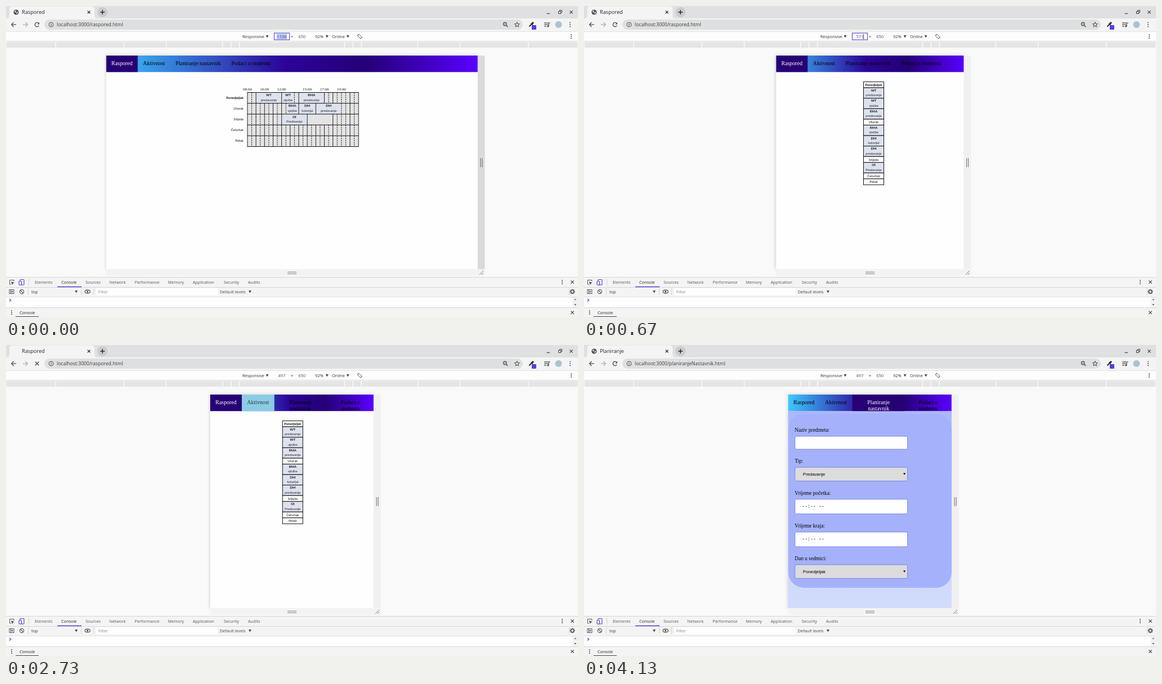
An HTML page with a canvas that plays this animation: 1014x552 px, repeating every 8000 ms.

```html
<!DOCTYPE html>
<html lang="bs">
<head>
<meta charset="utf-8">
<title>Raspored</title>
<style>
html, body { margin: 0; width: 100%; height: 100%; overflow: hidden; background: #f9f9f9; }
canvas { display: block; width: 1014px; height: 552px; }
</style>
</head>
<body>
<canvas id="stage"></canvas>
<script>
const canvas = document.getElementById('stage');
const c = canvas.getContext('2d');
const dpr = window.devicePixelRatio || 1;
canvas.width = 1014 * dpr;
canvas.height = 552 * dpr;

const LOOP = 8000;
const UI = '"Open Sans", "Noto Sans", sans-serif';
const SERIF = '"Liberation Serif", "Times New Roman", serif';
const SANS = '"Liberation Sans", Arial, sans-serif';
const MONO = '"Liberation Mono", monospace';
const PAGE = 'Lato, "Open Sans", sans-serif';
const TOP = 88, NAV_END = 117.3, BOTTOM = 467;

// ---- drawing helpers ----
function rect(x, y, w, h, fill) {
  c.fillStyle = fill;
  c.fillRect(x, y, w, h);
}
function round(x, y, w, h, r, fill, stroke, lw = 1) {
  c.beginPath();
  c.roundRect(x, y, w, h, r);
  if (fill) { c.fillStyle = fill; c.fill(); }
  if (stroke) { c.strokeStyle = stroke; c.lineWidth = lw; c.stroke(); }
}
function path(points, color, lw = 1, fill) {
  c.beginPath();
  for (let i = 0; i < points.length; i += 2) c.lineTo(points[i], points[i + 1]);
  if (fill) { c.fillStyle = color; c.fill(); return; }
  c.strokeStyle = color;
  c.lineWidth = lw;
  c.stroke();
}
function arc(x, y, r, color, lw, from = 0, to = Math.PI * 2) {
  c.beginPath();
  c.arc(x, y, r, from, to);
  if (lw) { c.strokeStyle = color; c.lineWidth = lw; c.stroke(); }
  else { c.fillStyle = color; c.fill(); }
}
function text(s, x, y, size, family = UI, color = '#333', align = 'left', weight = '') {
  c.font = `${weight} ${size}px ${family}`;
  c.fillStyle = color;
  c.textAlign = align;
  c.fillText(s, x, y);
}
function cross(x, y, r, color, lw = 1.2) {
  path([x - r, y - r, x + r, y + r], color, lw);
  path([x - r, y + r, x + r, y - r], color, lw);
}
function dots(x, y, gap = 3.5) {
  for (const d of [-gap, 0, gap]) arc(x, y + d, 0.95, '#444');
}
function down(x, y, r = 2.4, color = '#444') {
  path([x - r, y - r * 0.8, x + r, y - r * 0.8, x, y + r], color, 1, true);
}
function gradient(x0, y0, x1, y1, stops) {
  const g = c.createLinearGradient(x0, y0, x1, y1);
  for (const [p, color] of stops) g.addColorStop(p, color);
  return g;
}

// ---- timeline ----
const DRAG = [[0, 1130], [1, 1112], [4, 939], [10, 571], [11, 530], [12, 506], [13, 495], [14, 497]];

function widthAt(step) {
  const i = DRAG.findIndex(k => k[0] >= step);
  if (i < 0) return 497;
  if (i === 0) return 1130;
  const [a, va] = DRAG[i - 1], [b, vb] = DRAG[i];
  return Math.round(va + (vb - va) * (step - a) / (b - a));
}

function stateAt(t) {
  const step = Math.floor(t * 0.015 + 0.055);
  return {
    width: widthAt(step),
    selected: step < 1,
    dragging: step >= 1 && step < 14,
    grip: step < 1 || (t >= 1870 && t < 2000),
    caret: step >= 1 && t < 2130,
    focus: t < 2730,
    page: t < 2800 ? 0 : t < 4130 ? 1 : 2,
    hover: t >= 2730 && t < 2800 ? 1 : t >= 4070 && t < 4130 ? 2 : -1,
    loading: (t >= 2730 && t < 2870) || (t >= 4070 && t < 4130)
  };
}

// ---- browser frame ----
const TITLES = ['Raspored', 'Aktivnosti', 'Planiranje'];
const FILES = ['raspored', 'aktivnost', 'planiranjeNastavnik'];

function drawBrowser(s) {
  rect(0, 0, 1014, 22, '#dfe0e1');
  rect(0, 22, 1014, 23, '#f4f4f4');
  c.beginPath();
  c.moveTo(1, 22);
  c.quadraticCurveTo(6, 22, 6, 16);
  c.lineTo(6, 6);
  c.quadraticCurveTo(6, 0.5, 11, 0.5);
  c.lineTo(152, 0.5);
  c.quadraticCurveTo(157, 0.5, 157, 6);
  c.lineTo(157, 16);
  c.quadraticCurveTo(157, 22, 162, 22);
  c.fillStyle = '#f4f4f4';
  c.fill();
  if (!s.loading) {
    arc(18, 11, 4.6, '#4c4f52');
    path([15, 9, 18, 8, 18, 10, 16, 12], '#e4e4e4', 1, true);
    path([19, 11, 21.5, 10, 20, 14, 18, 13], '#e4e4e4', 1, true);
  }
  text(TITLES[s.page], 28, 14, 9.2, UI, '#222');
  cross(147, 11, 2.4, '#222', 1.3);
  arc(171, 11, 9, '#cbcccd');
  path([167, 11, 175, 11], '#222', 1.4);
  path([171, 7, 171, 15], '#222', 1.4);

  path([958.5, 13.5, 964, 13.5], '#444', 1.2);
  c.strokeStyle = '#444';
  c.lineWidth = 1;
  c.strokeRect(979.5, 9.5, 4, 4);
  path([981.5, 9, 981.5, 7.5, 985.5, 7.5, 985.5, 11.5, 984, 11.5], '#444');
  cross(1002, 11, 2.6, '#444');

  const arrow = (x, d, color) => {
    path([x - 4, 33, x + 4, 33], color, 1.2);
    path([x + d * 0.5, 29, x + d * 4.3, 33, x + d * 0.5, 37], color, 1.2);
  };
  arrow(14, -1, '#444');
  arrow(34, 1, '#aaa');
  if (s.loading) cross(55, 33, 3.2, '#444', 1.3);
  else {
    arc(55, 33, 3.7, '#444', 1.3, 0.5, 5.5);
    path([59, 29, 59, 32.5, 55.5, 32.5], '#444', 1, true);
  }

  round(68, 24, 848, 18, 9, '#dedfe0');
  arc(80, 33, 4, '#555', 1);
  path([80, 32, 80, 35.3], '#555', 1.1);
  path([80, 30.4, 80, 31.4], '#555', 1.1);
  text('localhost:3000/' + FILES[s.page] + '.html', 90, 36.2, 8.55, UI, '#3c3c3c');
  arc(884.5, 32, 2.9, '#444', 1.1);
  path([886.7, 34.2, 889.5, 37], '#444', 1.3);
  path([883, 32, 886, 32], '#444', 0.8);
  const star = [];
  for (let i = 0; i <= 10; i++) {
    const r = i % 2 ? 2 : 4.6, a = i * Math.PI / 5 - Math.PI / 2;
    star.push(906 + r * Math.cos(a), 33.2 + r * Math.sin(a));
  }
  path(star, '#444', 1);

  path([927.5, 36.5, 932, 32], '#222', 1.8);
  path([930.5, 30.5, 934, 34], '#222', 1.4);
  path([932.5, 31.5, 935, 29], '#222', 3);
  round(932, 34, 8, 8, 1, '#5141dd');
  for (const y of [30, 33]) path([954, y, 961, y], '#444', 1.2);
  path([954, 36, 958, 36], '#444', 1.2);
  path([962, 36, 962, 30, 965, 30], '#444', 1.2);
  arc(960.8, 36, 1.5, '#444');
  arc(979.5, 33, 6, '#a9c3d2');
  dots(1000, 33);
}

function drawDeviceBar(s) {
  rect(0, 45, 1014, 17.5, '#fdfdfd');
  rect(0, 45, 1014, 0.7, '#d8d8d8');
  rect(0, 62, 1014, 0.8, '#d4d4d4');
  text('Responsive', 419, 57, 7.4);
  down(463, 54);
  if (s.focus) {
    c.strokeStyle = '#5a50d8';
    c.lineWidth = 1.2;
    c.strokeRect(475.5, 48, 27, 12);
  }
  if (s.selected) rect(480, 49.5, 18, 9.5, '#b4c6ee');
  text(s.width, 489, 57, 7.6, UI, '#4b4e7c', 'center');
  if (s.caret) rect(495.2, 50, 0.9, 9, '#222');
  text('×', 507, 57, 7.6, UI, '#333', 'center');
  text('650', 524.7, 57, 7.6, UI, '#4b4e7c', 'center');
  text('92%', 548, 57, 7.4);
  down(569, 54);
  text('Online', 578, 57, 7.4);
  down(606, 54);
  c.save();
  c.translate(627, 54);
  c.rotate(-Math.PI / 4);
  round(-1.8, -3.6, 3.6, 7.2, 0.5, null, '#555', 0.9);
  c.restore();
  arc(627, 54, 4.2, '#555', 0.8, 0.2, 1.4);
  arc(627, 54, 4.2, '#555', 0.8, 3.3, 4.5);
  dots(1002, 54, 3);

  rect(1, 64, 1012, 10, '#e5e5e5');
  for (const x of [88, 209, 284, 384, 399, 414]) {
    rect(x - 0.7, 64, 1.4, 10, '#fdfdfd');
    rect(1014 - x - 0.7, 64, 1.4, 10, '#fdfdfd');
  }
}

function drawDevTools() {
  rect(0, 481, 1014, 71, '#f4f4f4');
  for (const y of [481, 499, 516, 535]) rect(0, y, 1014, 0.8, '#cfcfcf');
  path([9, 494, 6.5, 494, 6.5, 486.5, 14, 486.5, 14, 489], '#555');
  path([9, 489, 15, 491.5, 12.3, 492.3, 11, 495], '#444', 1, true);
  round(25, 485.5, 7, 9.5, 1, null, '#5b3fd6', 1.1);
  round(23, 488.5, 4.5, 6.5, 1, '#f4f4f4', '#5b3fd6', 1.1);
  rect(40, 484, 0.8, 12, '#ccc');
  const tabs = { Elements: 51, Console: 98, Sources: 141, Network: 183, Performance: 228,
    Memory: 287, Application: 331, Security: 386, Audits: 429 };
  for (const name in tabs) text(name, tabs[name], 493, 7.3, UI, name === 'Console' ? '#222' : '#555');
  rect(91, 497.7, 43, 1.4, '#5a35d8');
  dots(986, 490, 3);
  cross(1004, 490, 2.7, '#444');

  c.strokeStyle = '#555';
  c.lineWidth = 1;
  c.strokeRect(6, 503.5, 8, 7);
  path([8.5, 503.5, 8.5, 510.5], '#555');
  path([10, 505, 13, 507, 10, 509], '#555', 1, true);
  arc(28, 507, 3.6, '#555', 1.1);
  path([25.5, 504.5, 30.5, 509.5], '#555', 1.1);
  rect(39, 501, 0.8, 12, '#ccc');
  text('top', 45, 510, 7.4);
  down(124.5, 507);
  rect(133, 501, 0.8, 12, '#ccc');
  c.beginPath();
  c.ellipse(144.5, 507, 4.6, 2.9, 0, 0, Math.PI * 2);
  c.strokeStyle = '#444';
  c.lineWidth = 1.1;
  c.stroke();
  arc(144.5, 507, 1.6, '#444');
  rect(155, 501, 0.8, 12, '#ccc');
  rect(160, 501, 215, 12.5, '#fefefe');
  text('Filter', 163.5, 510, 7.4, UI, '#888');
  text('Default levels', 379, 510, 7.3, UI, '#444');
  down(432.5, 507);
  rect(998, 501, 0.8, 12, '#ccc');
  for (let i = 0; i < 8; i++) {
    const a = i * Math.PI / 4;
    path([1004 + 2.5 * Math.cos(a), 507 + 2.5 * Math.sin(a),
      1004 + 4.6 * Math.cos(a), 507 + 4.6 * Math.sin(a)], '#555', 1.6);
  }
  arc(1004, 507, 2.7, '#555', 1.6);

  rect(0, 516.8, 1014, 18.2, '#fefefe');
  path([6, 520, 8.8, 522.3, 6, 524.6], '#4d50dd', 1.3);
  rect(1004.5, 517, 9.5, 18, '#f1f1f1');
  path([1007.2, 522, 1009.2, 519.5, 1011.2, 522], '#777', 1, true);
  path([1007.2, 529, 1009.2, 531.5, 1011.2, 529], '#555', 1, true);
  dots(10, 544, 3);
  text('Console', 24, 547, 7.3, UI, '#222');
  rect(17, 550.8, 41, 1.2, '#5c5470');
  cross(1004, 544, 2.7, '#444');
}

// ---- device frame ----
function drawDevice(x0, x1, grip) {
  rect(0, 74, 1014, 407, '#f9f9f9');
  c.save();
  c.shadowColor = 'rgba(0,0,0,.2)';
  c.shadowBlur = 6;
  rect(x0, TOP, x1 - x0, BOTTOM - TOP, '#fefefe');
  c.restore();
  rect(x1, TOP, 12.5, BOTTOM - TOP, grip ? '#dadada' : '#f0f0f0');
  rect(x0, BOTTOM, x1 - x0 + 12.5, 12, '#f3f3f3');
  for (const dx of [5, 8]) rect(x1 + dx - 0.5, 270, 1.1, 16, '#777');
  for (const y of [471.7, 474.7]) rect(499, y, 16, 1.1, '#888');
  path([x1 + 3, 477, x1 + 10, 470], '#777');
  path([x1 + 7, 477, x1 + 10, 474], '#777');
}

const LINKS = [['Raspored'], ['Aktivnost'], ['Planiranje', 'nastavnik'], ['Podaci o', 'studentu']];

function drawNav(s, x0, x1) {
  const size = 9.9, pad = 9.35;
  c.font = `${size}px ${SERIF}`;
  const widths = LINKS.map(l => c.measureText(l.join(' ')).width + 2 * pad);
  const rest = x1 - x0 - widths[0] - widths[1];
  const wrap = widths[2] + widths[3] > rest;
  if (wrap) {
    widths[2] = rest * 0.528;
    widths[3] = rest - widths[2];
  }
  c.save();
  c.beginPath();
  c.rect(x0, TOP, x1 - x0, NAV_END - TOP);
  c.clip();
  rect(x0, TOP, x1 - x0, 30, gradient(x0, 0, x1, 0,
    [[0, '#3cc8ff'], [0.48, '#2b0498'], [0.7, '#240076'], [1, '#5a00ff']]));
  let x = x0;
  LINKS.forEach((lines, i) => {
    const active = i === s.page, over = i === s.hover;
    if (active || over) rect(x, TOP, widths[i], 30, over ? '#8accE3' : '#270074');
    const color = over ? '#30383c' : active ? '#fff' : '#000';
    const rows = wrap ? lines : [lines.join(' ')];
    rows.forEach((r, k) => text(r, x + widths[i] / 2, 105 + k * 11.4, size, SERIF, color, 'center'));
    x += widths[i];
  });
  c.restore();
}

// ---- timetable ----
// classes: name, kind, start and end in half hours after 08:00
const WEEK = [
  ['Ponedjeljak', ['WT', 'predavanje', 2, 8], ['WT', 'vježbe', 8, 11], ['RMA', 'predavanje', 12, 18]],
  ['Utorak', ['RMA', 'vježbe', 9, 12], ['DM', 'tutorijal', 12, 16], ['DM', 'predavanje', 16, 22]],
  ['Srijeda', ['OI', 'Predavanje', 8, 14], ['', '', 14, 20]],
  ['Četvrtak'],
  ['Petak']
];
const FILL = '#dde2ee', INK = '#111';

function classText(name, kind, x, y) {
  text(name, x, y + 6.7, 5.9, PAGE, INK, 'center', 'bold');
  text(kind, x, y + 15, 5.9, PAGE, '#222', 'center');
}

function drawTable(left) {
  const cell = 197 / 26, row = 19.2, y0 = 153.5;
  const at = i => left + i * cell;
  for (const h of [8, 10, 12, 15, 17, 19]) {
    text(String(h).padStart(2, '0') + ':00', at((h - 8) * 2), 150, 7, SERIF, INK, 'center');
  }
  rect(left, y0, 197, row * 5, '#e4e4e4');
  WEEK.forEach(([day, ...classes], r) => {
    const y = y0 + r * row;
    text(day, left - 7, y + 11, 5.9, PAGE, INK, 'right', r ? '' : 'bold');
    for (const [name, , from, to] of classes) {
      if (name) rect(at(from), y, (to - from) * cell, row, FILL);
    }
    for (let i = 0; i <= 26; i++) {
      if (classes.some(k => i > k[2] && i < k[3])) continue;
      c.setLineDash(i % 2 || i === 22 ? [2.4, 1.4] : []);
      path([at(i), y, at(i), y + row], INK, 0.9);
    }
    c.setLineDash([]);
    for (const [name, kind, from, to] of classes) classText(name, kind, at((from + to) / 2), y);
  });
  for (let r = 0; r <= 5; r++) path([left - 0.4, y0 + r * row, left + 197.4, y0 + r * row], INK, 1);
}

function drawList(cx) {
  let y = 134.6;
  const box = (h, fill) => {
    rect(cx - 18, y, 36, h, fill);
    c.strokeStyle = INK;
    c.lineWidth = 1;
    c.strokeRect(cx - 18, y, 36, h);
  };
  WEEK.forEach(([day, ...classes], r) => {
    box(10.5, '#fefefe');
    text(day, cx, y + 7.3, 5.9, PAGE, INK, 'center', r ? '' : 'bold');
    y += 10.5;
    for (const [name, kind] of classes) {
      if (!name) continue;
      box(18.6, FILL);
      classText(name, kind, cx, y);
      y += 18.6;
    }
  });
}

// ---- other pages ----
function drawSky(x0, x1) {
  rect(x0, NAV_END, x1 - x0, BOTTOM - NAV_END, gradient(0, NAV_END, 0, BOTTOM,
    [[0, '#abb6fc'], [0.13, '#b3c0fb'], [0.36, '#c9d5fb'], [1, '#d1dcfb']]));
}

function drawActivity(y, x, w, h, r, legend, kind, from, to) {
  const ink = '#2a7293', soft = '#3b7ba8', cx = 506;
  c.save();
  c.beginPath();
  c.rect(x - 3, y - 3, 466 - x + 3, 12);
  c.rect(548, y - 3, x + w - 545, 12);
  c.rect(x - 3, y + 8, w + 6, h);
  c.clip();
  round(x, y, w, h, r, null, ink, 1.8);
  c.restore();
  const line = (s, dy, dx = 0) => text(s, cx + dx, y + dy, 9.7, PAGE, soft, 'center');
  line(legend, 4, 1);
  text('WT', cx, y + 32.7, 11.4, PAGE, ink, 'center', 'bold');
  text(kind, cx + 1, y + 48.7, 11, PAGE, ink, 'center', 'bold');
  line('Preostalo vrijeme: 60min', 73.8);
  line('Pocetak: ' + from, 87);
  line('Kraj: ' + to, 100.6, 1);
}

function drawForm(x0, x1) {
  round(x0, 122, x1 - x0, 309, 28, '#a5b2fb');
  const field = (label, y, h, value, select) => {
    text(label, 373.5, y - 8, 9.33, SERIF, '#000');
    round(374, y, 199.5, h, 2.5, select ? '#dcdcdd' : '#fefefe', '#747be0', 0.9);
    const mid = y + h / 2;
    if (select) {
      text(value, 388, mid + 2.6, 7.77, SANS, '#000');
      down(568, mid - 0.3, 2, '#000');
    } else text(value, 386.5, mid + 2.4, 8.2, MONO, '#111');
  };
  field('Naziv predmeta:', 162, 23, '');
  field('Tip:', 217, 24.3, 'Predavanje', true);
  field('Vrijeme početka:', 273.8, 26, '--:-- --');
  field('Vrijeme kraja:', 332, 26, '--:-- --');
  field('Dan u sedmici:', 390, 24.3, 'Ponedjeljak', true);
}

function drawPage(s, x0, x1) {
  if (s.page === 0) {
    if (s.width > 600) drawTable(s.dragging ? 432 : 428);
    else drawList(s.dragging ? 513.5 : 508.2);
    return;
  }
  drawSky(x0, x1);
  if (s.page === 1) {
    drawActivity(136.8, 433.2, 148, 143.7, 13, 'Trenutna aktivnost', 'Predavanja', '09:00', '12:00');
    drawActivity(299, 442.6, 128.6, 125.5, 20, 'Sljedeca aktivnost', 'Vjezbe', '12:00', '13:30');
  } else drawForm(x0, x1);
}

function render(t) {
  const s = stateAt(t);
  const half = s.width * 0.2915;
  const x0 = 506.9 - half, x1 = 506.9 + half;
  c.setTransform(dpr, 0, 0, dpr, 0, 0);
  drawDevice(x0, x1, s.grip);
  drawPage(s, x0, x1);
  drawNav(s, x0, x1);
  drawBrowser(s);
  drawDeviceBar(s);
  drawDevTools();
}

let start;
function tick(now) {
  start ??= now;
  render(Math.max(0, now - start) % LOOP);
  requestAnimationFrame(tick);
}
requestAnimationFrame(tick);
</script>
</body>
</html>
```
